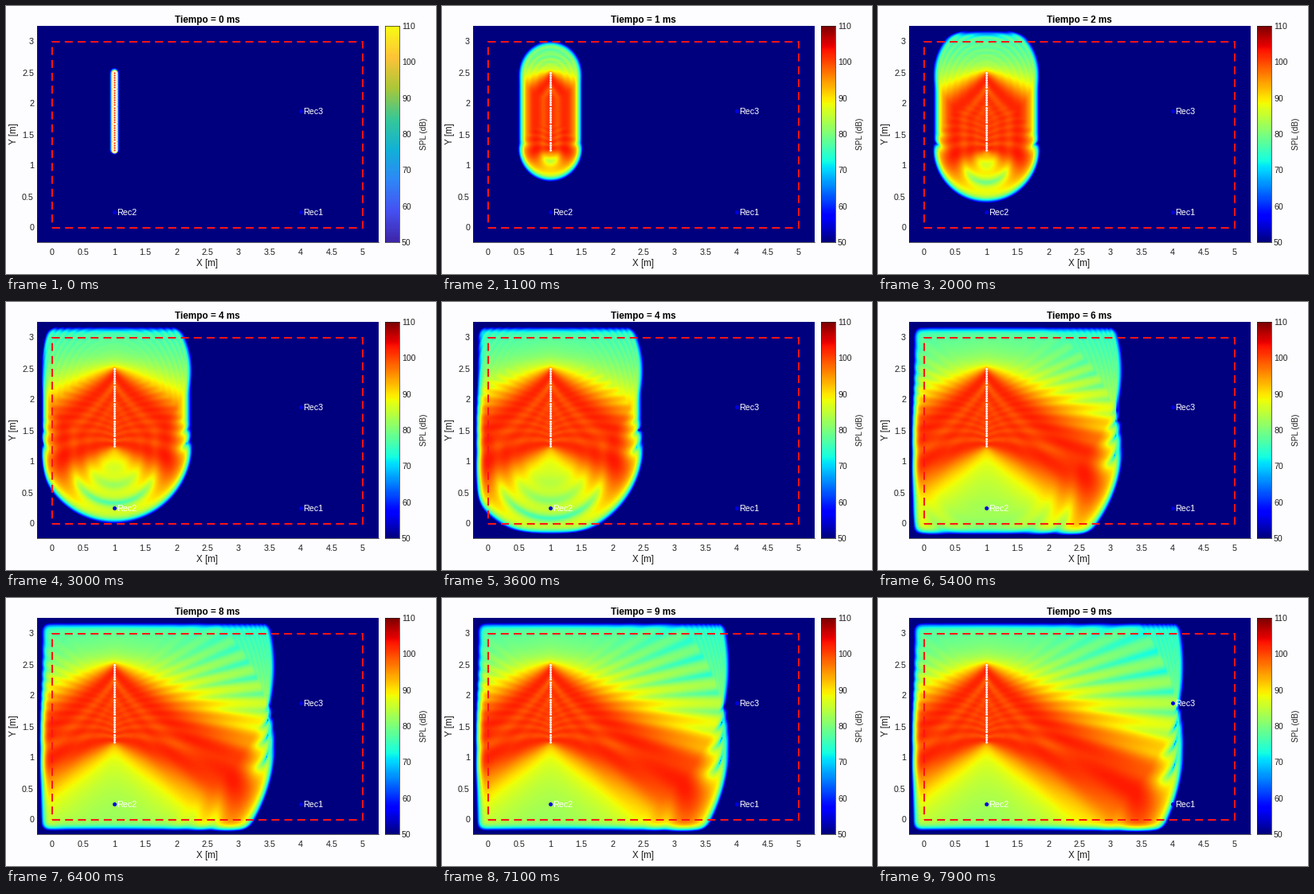
Recreate the animation shown at these times as a matplotlib script. Size 540 px wide and 337 px high, loop 8000 ms.

```python
import numpy as np
import matplotlib.pyplot as plt
from matplotlib.animation import FuncAnimation
from matplotlib.colors import LinearSegmentedColormap
from matplotlib.patches import Rectangle

W, H, DPI = 540, 337, 100
PX_PER_M = 78
LEFT, RIGHT, TOP, BOTTOM = 39, 467.5, 25, 297
X0, Y0 = 58, 278.5                      # pixel position of the room origin
FRAMES, INTERVAL = 80, 100
ROOM_W, ROOM_H = 5, 3
INK = "#202020"

plt.rcParams["font.family"] = "Liberation Sans"
PARULA = LinearSegmentedColormap.from_list("parula_like", [
    "#3e26a8", "#4651f2", "#2f87f7", "#12b1d6",
    "#38c896", "#abc739", "#fec338", "#f9fb15"])


def pt(px):
    return px * 72 / DPI


def to_x(px):
    return (px - X0) / PX_PER_M


def to_y(px):
    return (Y0 - px) / PX_PER_M


fig = plt.figure(figsize=(W / DPI, H / DPI), dpi=DPI, facecolor="#fdfcfe")


def label(x, y, text, size=10.8, **kw):
    kw = {"ha": "center", "va": "baseline", "color": INK, **kw}
    return fig.text(x / W, 1 - y / H, text, fontsize=pt(size), **kw)


def axes_at(left, top, right, bottom):
    return fig.add_axes([left / W, 1 - bottom / H,
                         (right - left) / W, (bottom - top) / H])


# Line array: equal sources, phased to steer the beam 30 degrees down
K = 2 * np.pi / 0.145
STEER = np.radians(30)
SRC_X = 1.0
SRC_Y = np.linspace(1.25, 2.5, 32)
RAMP = 0.16
GAIN_DB = 80
TONES = ((0.94, 0.25), (1, 0.5), (1.06, 0.25))    # relative frequency, power

extent = [to_x(LEFT), to_x(RIGHT), to_y(BOTTOM), to_y(TOP)]
NX, NY = 285, 181
gx = extent[0] + (np.arange(NX) + 0.5) / NX * (extent[1] - extent[0])
gy = extent[2] + (np.arange(NY) + 0.5) / NY * (extent[3] - extent[2])
GX, GY = np.meshgrid(gx, gy)

dist = np.hypot(GX - SRC_X, GY - SRC_Y[:, None, None]).astype(np.float32)
delay = K * SRC_Y[:, None, None] * np.sin(STEER)
spread = 1 / np.sqrt(dist + 0.01)
waves = []
for ratio, power in TONES:
    phase = ratio * K * dist - delay
    for part in (np.cos, np.sin):
        waves.append((np.sqrt(power) * part(phase) * spread).astype(np.float32))


def layer_loss(pos, size):
    outside = np.maximum(np.maximum(-pos, pos - size), 0)
    return 50 * (outside / 0.21) ** 3


loss = layer_loss(GX, ROOM_W) + layer_loss(GY, ROOM_H)


def spl(step):
    reach = (10 + 3.88 * step) / PX_PER_M
    gate = np.clip((reach - dist) / RAMP, 0, 1)
    gate *= gate
    gate *= gate
    power = sum(np.einsum("sij,sij->ij", wave, gate) ** 2 for wave in waves)
    return 10 * np.log10(power + 1e-9) + GAIN_DB - loss


ax = axes_at(LEFT, TOP, RIGHT, BOTTOM)
field = ax.imshow(spl(0), extent=extent, origin="lower", cmap="jet",
                  vmin=50, vmax=110, interpolation="bilinear", aspect="auto")
ax.set(xlim=extent[:2], ylim=extent[2:], xticks=[], yticks=[])
for side, spine in ax.spines.items():
    spine.set(visible=side in ("left", "bottom"), linewidth=0.5, color=INK)

ax.add_patch(Rectangle((0, 0), ROOM_W, ROOM_H, fill=False, edgecolor="#ff1414",
                       linewidth=pt(2), linestyle=(0, (5, 3.1))))


def dots(x, y, size, color, z=3):
    return ax.plot(x, y, "o", ms=pt(size), mfc=color, mec="none", zorder=z)[0]


src_x = np.full(SRC_Y.size, SRC_X)
sources = dots(src_x, SRC_Y, 2.9, "white")
start_glow = dots(src_x, SRC_Y, 8, "#ffd83a", 2.5)
start_core = dots(src_x, SRC_Y, 2.2, "#ff3010", 4)

for name, rx, ry in (("Rec1", 4, 0.25), ("Rec2", 1, 0.25), ("Rec3", 4, 1.88)):
    dots(rx, ry, 5, "#0000e0", 5)
    label(X0 + rx * PX_PER_M + 3.5, Y0 - ry * PX_PER_M + 4, name,
          color="white", ha="left")

for i in range(11):
    label(X0 + i * PX_PER_M / 2, 313, f"{i / 2:g}")
for i in range(7):
    label(35, Y0 - i * PX_PER_M / 2 + 4, f"{i / 2:g}", ha="right")
label(253, 327.5, "X [m]", 11.6)
label(10, 161, "Y [m]", 11.6, rotation=90, va="center")
title = label(253, 20.5, "", 11.7, weight="bold", color="black")

bar_ax = axes_at(476, TOP, 494, BOTTOM)
bar = bar_ax.imshow(np.linspace(0, 1, 256)[:, None], origin="lower",
                    aspect="auto", cmap="jet")
bar_ax.set(xticks=[], yticks=[])
for spine in bar_ax.spines.values():
    spine.set(linewidth=0.5, color=INK)
for db in range(50, 111, 10):
    label(497, BOTTOM - (db - 50) / 60 * (BOTTOM - TOP) + 4, str(db), 10.5,
          ha="left")
label(525, 161, "SPL (dB)", 10, rotation=90, va="center")


def update(frame):
    step = frame - (frame + 3) // 5     # every fifth frame holds
    at_start = step == 0
    field.set_data(spl(step))
    title.set_text(f"Tiempo = {(15 * step + 50) // 100} ms")
    bar.set_cmap(PARULA if at_start else "jet")
    sources.set_markersize(pt(6 if at_start else 2.9))
    start_glow.set_visible(at_start)
    start_core.set_visible(at_start)
    return field, title, bar, sources, start_glow, start_core


anim = FuncAnimation(fig, update, frames=FRAMES, interval=INTERVAL,
                     repeat=True, repeat_delay=0, blit=False)
plt.show()
```
